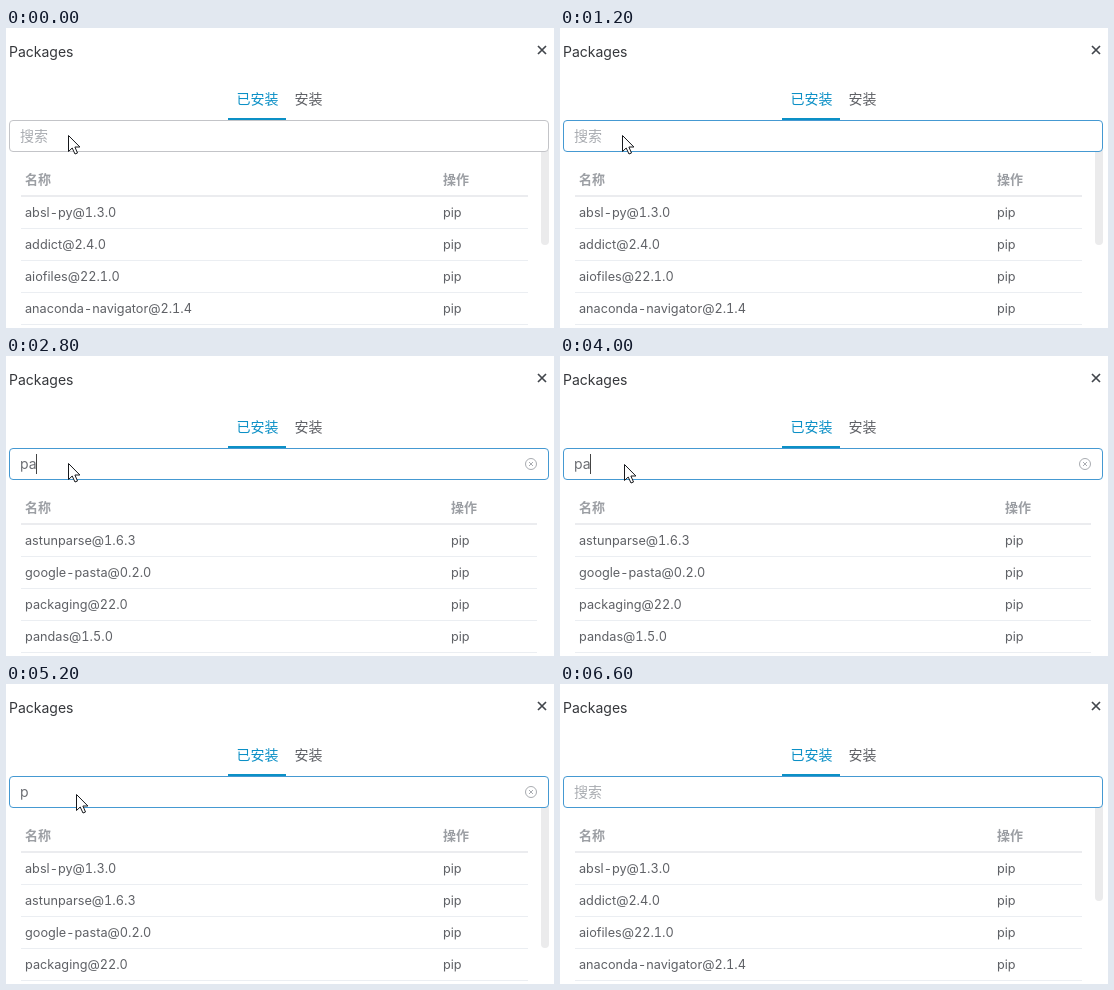
Write an HTML page that moves like this. It is 548 px wide and 300 px high and loops after 6800 ms.

```html
<!DOCTYPE html>
<html lang="zh">
<head>
<meta charset="utf-8">
<title>Packages</title>
<style>
html, body { margin: 0; width: 100%; height: 100%; overflow: hidden; background: #fff; }
svg { display: block; width: 548px; height: 300px; }
text {
  font-family: Inter, "Noto Sans CJK SC", "Noto Sans CJK", sans-serif;
  font-variant-numeric: tabular-nums;
}
</style>
</head>
<body>
<svg id="stage" viewBox="0 0 548 300"></svg>
<script>
const LOOP = 6800, STEP = 200, BLINK = 540;
const ROW = 32, TABLE_TOP = 168;
const BLUE = '#0c90c6', GRAY = '#a9acb1', INK = '#5f6166';
const stage = document.getElementById('stage');

const PACKAGES = ['absl-py@1.3.0', 'addict@2.4.0', 'aiofiles@22.1.0', 'anaconda-navigator@2.1.4',
  'astunparse@1.6.3', 'google-pasta@0.2.0', 'packaging@22.0', 'pandas@1.5.0'];

// Each edit sets the search text; the caret blinks from `blink` on.
const EDITS = [
  { start: 0, query: '', blink: Infinity },
  { start: 600, query: '', blink: 560 },
  { start: 2800, query: 'pa', blink: 2800 },
  { start: 4600, query: 'pa', blink: 4600 },
  { start: 4800, query: 'p', blink: 4600 },
  { start: 5200, query: 'p', blink: Infinity },
  { start: 5800, query: '', blink: 6400 },
  { start: 6600, query: '', blink: Infinity }
];

const clamp = v => Math.min(1, Math.max(0, v));
const text = (str, x, y, size, color, weight = 400) =>
  `<text x="${x}" y="${y}" font-size="${size}" fill="${color}" font-weight="${weight}">${str}</text>`;
const rect = (x, y, w, h, fill, extra = '') =>
  `<rect x="${x}" y="${y}" width="${w}" height="${h}" fill="${fill}" ${extra}/>`;
const path = (d, stroke, width = 1, fill = 'none') =>
  `<path d="${d}" stroke="${stroke}" stroke-width="${width}" fill="${fill}"/>`;
const circle = (x, y, r, fill, stroke = 'none') =>
  `<circle cx="${x}" cy="${y}" r="${r}" fill="${fill}" stroke="${stroke}"/>`;
const cross = (x, y, r, color, width) =>
  path(`M${x - r} ${y - r}L${x + r} ${y + r}M${x + r} ${y - r}L${x - r} ${y + r}`, color, width);

// A small drift to the right, then a slowing slide out through the bottom.
function pointerAt(t) {
  const drift = clamp((t - 3800) / 800);
  const leave = Math.sqrt(Math.max(0, t - 5800) / 400);
  return { x: 62 + 8 * drift, y: 107 + Math.round(3 * drift) + Math.round(175 * leave) };
}

function header() {
  return text('Packages', 3, 29, 14, '#36383c') +
    cross(536, 22, 4, '#42464c', 1.7) +
    text('已安装', 230.5, 76, 14, BLUE) +
    text('安装', 288.5, 76, 14, INK) +
    rect(222, 90, 58, 2, BLUE);
}

function searchBox(query, focused, caret) {
  const border = focused ? '#4599d2' : '#c3c4c8';
  const content = query
    ? text(query, 14, 113, 14, '#6c6e73') + circle(525, 108, 5.5, 'none', GRAY) + cross(525, 108, 2, GRAY, 1)
    : text('搜索', 14, 113, 14, GRAY);
  return rect(3.5, 92.5, 539, 31, '#fff', `rx="3.5" stroke="${border}"`) + content +
    (caret ? rect(14 + query.length * 8, 98, 1, 20, '#444') : '');
}

function table(query, hover) {
  const rows = PACKAGES.filter(name => name.includes(query)).slice(0, 4);
  const scrolls = query.length < 2;
  const width = scrolls ? 507 : 516;
  const action = scrolls ? 437 : 445;
  const thumb = query ? 140 : 93;
  return text('名称', 19, 156, 13, '#9c9fa4', 700) +
    text('操作', action, 156, 13, '#9c9fa4', 700) +
    rect(15, TABLE_TOP - 1, width, 2, '#ebecef') +
    rows.map((name, i) => {
      const y = TABLE_TOP + i * ROW;
      return (i === hover ? rect(15, y + 1, width, ROW - 1, '#f5f7fa') : '') +
        text(name, 19, y + 21, 12.7, INK) +
        text('pip', action, y + 21, 12.7, INK) +
        rect(15, y + ROW, width, 1, '#ebeef2');
    }).join('') +
    (scrolls ? rect(535, 120, 8, thumb + 4, '#ebebec', 'rx="4"') : '');
}

function pointer({ x, y }) {
  const outline = 'l0 16l3.7 -3.5l2.8 6l2.5 -1l-2.6 -6l5 0z';
  return path(`M${x + 0.5} ${y + 0.5}${outline}`, '#16181c', 1, '#fff');
}

function draw(t) {
  const { query, blink } = EDITS.findLast(edit => t >= edit.start);
  const caret = t >= blink && Math.floor((t - blink) / BLINK) % 2 === 0;
  const clicking = t >= 400 && t < 600;
  const tip = pointerAt(t);
  const hover = Math.floor((tip.y - TABLE_TOP) / ROW);
  stage.innerHTML = header() + table(query, hover) + searchBox(query, t >= 600, caret) +
    (clicking ? circle(74, 122, 21.5, 'rgba(255, 255, 0, 0.45)') : '') +
    pointer(tip);
}

const begin = performance.now();
let shown = -1;
function tick() {
  const t = Math.floor(((performance.now() - begin) % LOOP) / STEP) * STEP;
  if (t !== shown) draw(shown = t);
  requestAnimationFrame(tick);
}
tick();
</script>
</body>
</html>
```
